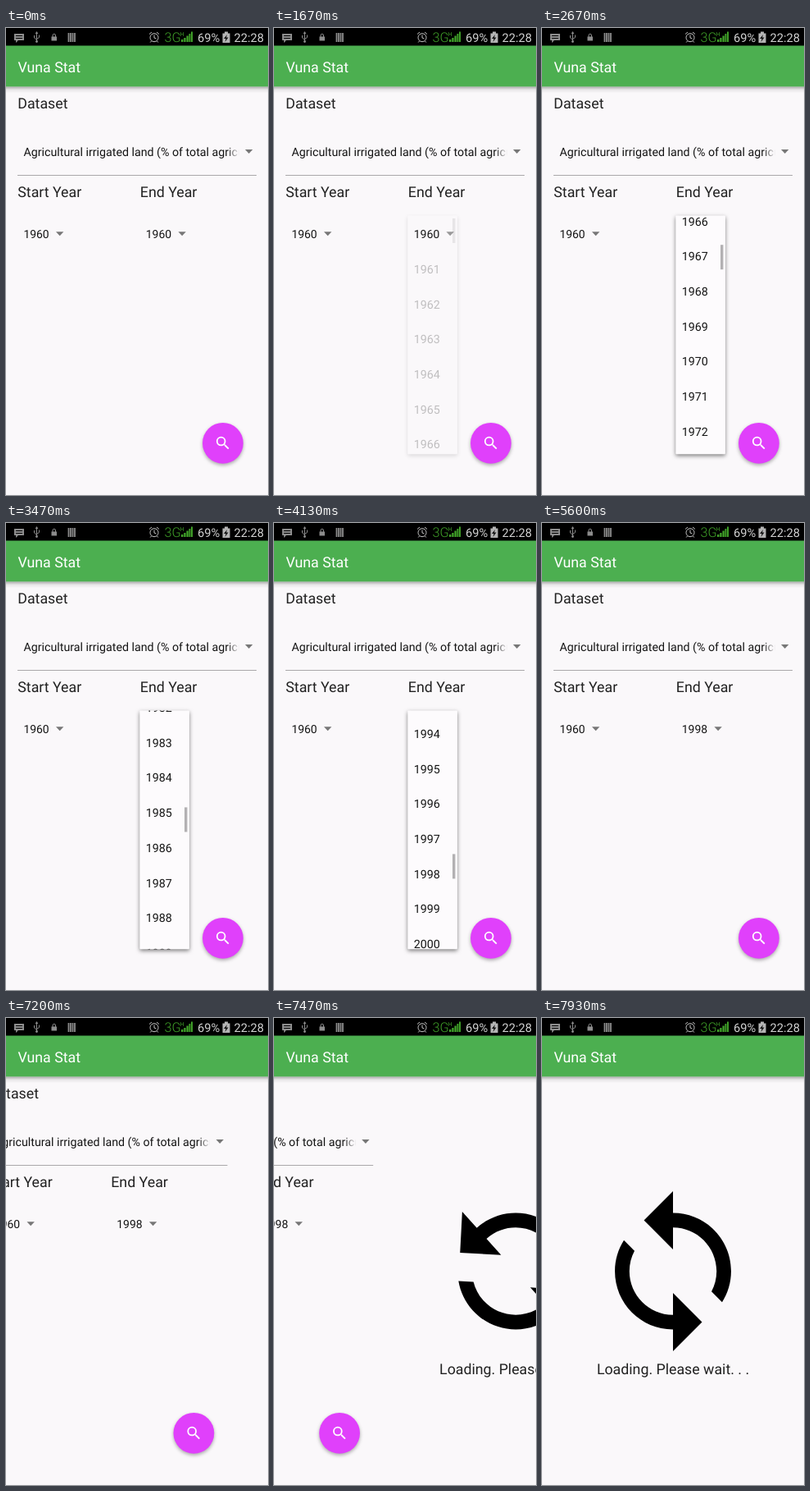
Animation of 320x569 px, one loop 8000 ms. Source, as an HTML page:

```html
<!DOCTYPE html>
<html lang="en">
<head>
<meta charset="utf-8">
<title>Dataset picker</title>
<style>
  html, body { margin: 0; width: 100%; height: 100%; overflow: hidden; background: #faf8fa; }
  svg { display: block; width: 320px; height: 569px; font-family: Roboto, "Open Sans", sans-serif; text-rendering: geometricPrecision; }
  .large { font-size: 17.78px; fill: #212121; }
  .item { font-size: 14.22px; fill: #141414; }
  .year { font-size: 13.9px; fill: #141414; }
  .status { font-size: 14.6px; fill: #d2d2d2; }
  .arrow { fill: #777; }
  #sheet { filter: drop-shadow(0 2px 2.5px rgba(0, 0, 0, .5)); }
  #disc { filter: drop-shadow(0 2px 2px rgba(0, 0, 0, .32)); }
</style>
</head>
<body>
<svg viewBox="0 0 320 569">
  <defs>
    <linearGradient id="fade" gradientUnits="userSpaceOnUse" x1="270" x2="285" y1="0" y2="0">
      <stop stop-color="#fff"/><stop offset="1" stop-color="#fff" stop-opacity="0"/>
    </linearGradient>
    <linearGradient id="barShade" x2="0" y2="1">
      <stop stop-color="#000" stop-opacity=".32"/>
      <stop offset=".5" stop-color="#000" stop-opacity=".07"/>
      <stop offset="1" stop-color="#000" stop-opacity="0"/>
    </linearGradient>
    <mask id="edge" maskUnits="userSpaceOnUse" x="14" y="130" width="271" height="40">
      <rect x="14" y="130" width="271" height="40" fill="url(#fade)"/>
    </mask>
    <clipPath id="window"><rect x="163" y="228.5" width="61" height="291"/></clipPath>
    <path id="caret" class="arrow" d="M0 0h9.4l-4.7 4.9z"/>
  </defs>

  <rect width="320" height="569" fill="#faf8fa"/>

  <g id="form">
    <text class="large" x="14.3" y="98.2">Dataset</text>
    <text class="item" x="21.5" y="156" mask="url(#edge)">Agricultural irrigated land (% of total agricultural land)</text>
    <use href="#caret" x="292" y="148"/>
    <path d="M14 179.5H306" stroke="#aaa8aa"/>
    <text class="large" x="14.3" y="206">Start Year</text>
    <text class="large" x="163.8" y="206">End Year</text>
    <text class="year" x="21.4" y="256.2">1960</text>
    <use href="#caret" x="61" y="248.3"/>
    <text class="year" id="endYear" x="170.8" y="256.2">1960</text>
    <use href="#caret" x="210.4" y="248.3"/>
    <g transform="translate(264.9 505.8)">
      <circle id="disc" r="24.9" fill="#e040fb"/>
      <circle id="ripple" fill="#fff" opacity="0"/>
      <path transform="scale(.889) translate(-12 -12)" fill="#fff" d="M15.5 14h-.79l-.28-.27A6.47 6.47 0 0 0 16 9.5 6.5 6.5 0 1 0 9.5 16c1.61 0 3.09-.59 4.23-1.57l.27.28v.79l5 4.99L20.49 19zm-6 0a4.5 4.5 0 1 1 0-9 4.5 4.5 0 0 1 0 9z"/>
    </g>
  </g>

  <g id="menu" opacity="0">
    <rect id="sheet" x="163.3" y="228.5" width="60.6" height="290.8" rx="1" fill="#fdfbfd"/>
    <g clip-path="url(#window)"><g id="years"></g></g>
    <rect id="thumb" x="218" y="232" width="3.4" height="30" fill="#b3b1b3"/>
  </g>

  <g id="loading" transform="translate(320 0)">
    <path id="sync" d="M12 4V1L8 5l4 4V6c3.31 0 6 2.69 6 6 0 1.01-.25 1.97-.7 2.8l1.46 1.46C19.54 15.03 20 13.57 20 12c0-4.42-3.58-8-8-8zm0 14c-3.31 0-6-2.69-6-6 0-1.01.25-1.97.7-2.8L5.24 7.74C4.46 8.97 4 10.43 4 12c0 4.42 3.58 8 8 8v3l4-4-4-4v3z"/>
    <text class="large" x="160" y="434" text-anchor="middle">Loading. Please wait. . .</text>
  </g>

  <rect y="71.3" width="320" height="8" fill="url(#barShade)"/>
  <rect y="21" width="320" height="50.4" fill="#4caf50"/>
  <text x="14.4" y="54.2" font-size="17.78" fill="#fff">Vuna Stat</text>

  <rect width="320" height="21.5" fill="#000"/>
  <g fill="#8c8c8c">
    <path d="M10 7h12v8h-7l-3 3v-3h-2z"/>
    <path d="M12 9.5h8M12 12.5h8" stroke="#000"/>
    <path d="M37.5 6v11M34.5 9v3l3 2.5M40.5 8.5v3l-3 2" fill="none" stroke="#8c8c8c"/>
    <path d="M37.5 4l1.8 3h-3.6z"/><circle cx="37.5" cy="16.5" r="1.4"/>
    <rect x="55.5" y="10.5" width="6.5" height="5"/>
    <path d="M57 11V9a1.75 1.75 0 0 1 3.5 0v2" fill="none" stroke="#8c8c8c"/>
    <path d="M76.5 6v11M79 6v11M81.5 6v11M84 6v11" stroke="#8c8c8c" stroke-width="1.8"/>
  </g>
  <g fill="none" stroke="#c4c4c4">
    <circle cx="181" cy="11.7" r="5"/>
    <path d="M181 8.5v3.5l2.5 1M175 7.5l3-2.5M187 7.5l-3-2.5M177.5 16l-1.3 1.5M184.5 16l1.3 1.5"/>
  </g>
  <g fill="#3f9f28">
    <text x="193.6" y="17" font-size="16.2" font-weight="300">3G</text>
    <text x="212.5" y="9.5" font-size="7">H</text>
    <path d="M214 17v-3h2.4v3zM217.2 17v-5h2.4v5zM220.4 17V9.5h2.4V17zM223.4 17V7h2v10zM226 17V4.5h2V17z"/>
  </g>
  <text class="status" x="234" y="17">69%</text>
  <path d="M264.5 6.5h2.5v-2h4v2h2.5V18h-9z" fill="#b4b4b4"/>
  <path d="M270 8l-4 5h2.5l-1 4 4-5.5H269z" fill="#111"/>
  <text class="status" x="278.5" y="17">22:28</text>
</svg>
<script>
const LOOP = 8000, STEP = 1000 / 15;
const ROW = 42.67;

// Keyframes as [time, value].
const SCROLL = [[2400, 0], [2467, 45], [2667, 272], [2867, 490], [3067, 680], [3267, 828],
  [3467, 965], [3667, 1125], [3867, 1282], [4133, 1445], [4267, 1480], [4400, 1490]];
const MENU = [[1600, 0], [1867, 1], [4733, 1], [5000, 0]];
const PRESS = [[6600, 0], [6667, .16], [6733, .14], [6800, 0]];

const $ = id => document.getElementById(id);
const set = (id, name, value) => $(id).setAttribute(name, value);

function track(keys, t) {
  if (t <= keys[0][0]) return keys[0][1];
  for (let i = 1; i < keys.length; i++) {
    const [t0, a] = keys[i - 1], [t1, b] = keys[i];
    if (t <= t1) return a + (b - a) * (t - t0) / (t1 - t0);
  }
  return keys[keys.length - 1][1];
}

for (let i = 0; i < 56; i++) {
  const label = document.createElementNS("http://www.w3.org/2000/svg", "text");
  label.setAttribute("class", "item");
  label.setAttribute("x", 170.7);
  label.setAttribute("y", 256.2 + i * ROW);
  label.textContent = 1960 + i;
  $("years").append(label);
}

function draw(t) {
  const scroll = track(SCROLL, t);
  set("menu", "opacity", track(MENU, t));
  set("years", "transform", `translate(0 ${-scroll})`);
  set("thumb", "y", 232 + scroll * .1186);
  $("endYear").textContent = t < 4790 ? 1960 : 1998;

  set("ripple", "opacity", track(PRESS, t));
  set("ripple", "r", track([[6600, 8], [6733, 24.9]], t));

  // Accelerate, then decelerate, across one screen width.
  const phase = Math.min(1, Math.max(0, (t - 7027) / 800));
  const shift = 160 * (1 - Math.cos(Math.PI * phase));
  set("form", "transform", `translate(${-shift} 0)`);
  set("loading", "transform", `translate(${320 - shift} 0)`);

  const turn = (t - 7933.33) * .09;
  set("sync", "transform", `translate(160 308.5) rotate(${turn}) scale(8.87) translate(-12 -12)`);
}

const start = performance.now();
function tick() {
  const t = (performance.now() - start) % LOOP;
  // The screen refreshes fifteen times a second.
  draw(Math.floor((t + 5) / STEP) * STEP);
  requestAnimationFrame(tick);
}
tick();
</script>
</body>
</html>
```
